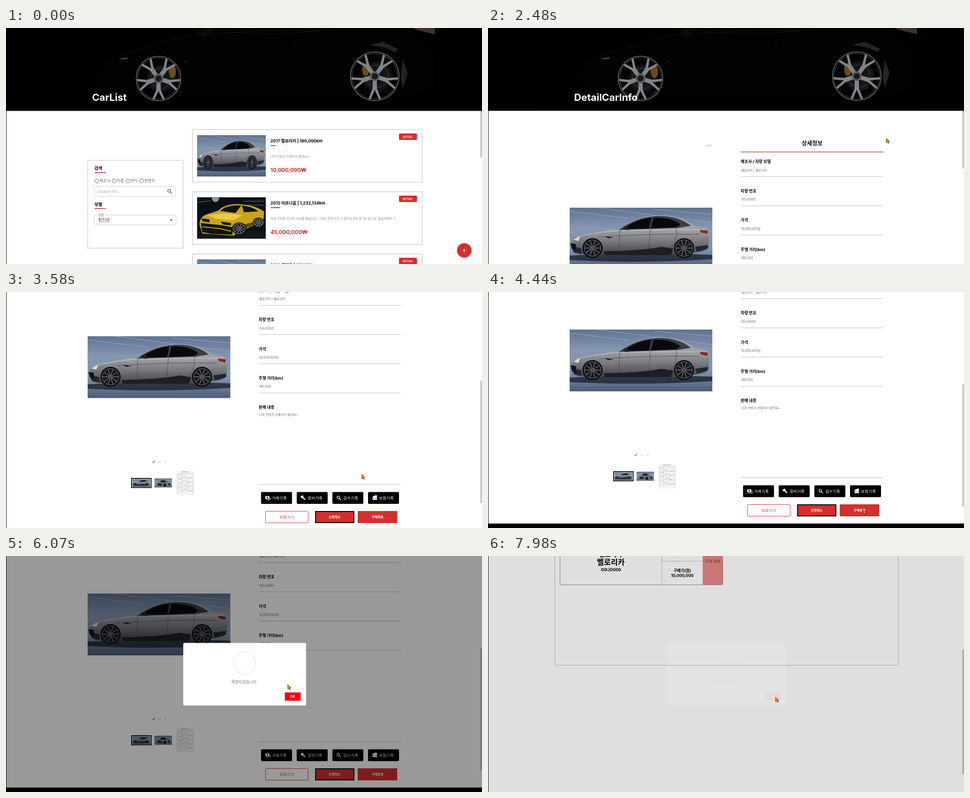
Write an HTML page that moves like this. It is 1061 by 528 pixels and loops after 8 s.

```html
<!DOCTYPE html>
<html lang="ko">
<head>
<meta charset="utf-8">
<style>
html, body { margin: 0; width: 100%; height: 100%; overflow: hidden; background: #fff; }
svg { display: block; width: 1061px; height: 528px; font-family: Inter, 'Noto Sans CJK KR', 'Noto Sans CJK JP', sans-serif; }
#thumb { mix-blend-mode: multiply; }
</style>
</head>
<body>
<svg id="stage" viewBox="0 0 1061 528"></svg>
<script>
const RED = '#d32f2f', BOLD = 'font-weight="700"', MID = 'text-anchor="middle"';
const MAKER = '벨로리카', PLATE = '00나0000', NOTE = '너무 연비가 안좋아서 팔아요~';

const text = (x, y, size, str, fill = '#000', extra = '') =>
  `<text x="${x}" y="${y}" font-size="${size}" fill="${fill}" ${extra}>${str}</text>`;
const rect = (x, y, w, h, fill, extra = '') =>
  `<rect x="${x}" y="${y}" width="${w}" height="${h}" fill="${fill}" ${extra}/>`;
const circle = (x, y, r, fill, extra = '') => `<circle cx="${x}" cy="${y}" r="${r}" fill="${fill}" ${extra}/>`;
const path = (d, fill, extra = '') => `<path d="${d}" fill="${fill}" ${extra}/>`;
const line = (d, stroke, width = 1, extra = '') => path(d, 'none', `stroke="${stroke}" stroke-width="${width}" ${extra}`);
const box = (x, y, w, h, stroke = '#bbb', r = 0) => rect(x, y, w, h, 'none', `stroke="${stroke}" rx="${r}"`);
const group = (id, body, extra = '') => `<g id="${id}" ${extra}>${body}</g>`;
const use = (id, x, y, w, h) => `<use href="#${id}" x="${x}" y="${y}" width="${w}" height="${h}"/>`;
const repeat = (n, f) => Array.from({ length: n }, (_, i) => f(i)).join('');
const gradient = (id, ...colors) => `<linearGradient id="${id}" x2="0" y2="1">${
  colors.map((c, i) => `<stop offset="${i / (colors.length - 1)}" stop-color="${c}"/>`).join('')}</linearGradient>`;
const symbol = (id, w, h, body) => `<symbol id="${id}" viewBox="0 0 ${w} ${h}" preserveAspectRatio="none">${body}</symbol>`;

// Photos as flat shapes
const smallWheel = (x, y, r) => circle(x, y, r, '#0d0e12') +
  circle(x, y, r * .82, '#15171c', 'stroke="#85878d" stroke-width="1"') +
  repeat(10, i => line(`M${x},${y}V${y - r * .8}`, '#8c8e94', 1.2, `transform="rotate(${i * 36 + 18} ${x} ${y})"`)) +
  circle(x, y, 2.5, '#44464c');

const sedan = rect(0, 0, 318, 139, 'url(#studio)') +
  line('M0,8L130,24M60,0L318,34M190,4L318,15', '#a6b6cb', 1.5, 'opacity=".5"') +
  path('M0,108Q160,98 318,106V116Q160,126 0,118Z', '#161d2c', 'opacity=".75"') +
  path('M3,84Q3,74 14,66Q60,52 112,49Q150,20 195,18Q245,17 276,40L304,46Q312,52 311,70L309,92Q300,98 285,100L230,108L75,108L20,104Q4,100 3,84Z', 'url(#silver)') +
  path('M108,50Q148,21 195,19Q243,18 270,41L240,46L122,50Z', '#3a3d44') +
  path('M119,48Q150,25 182,23L177,47ZM187,23Q226,21 247,38L238,44L181,47Z', '#07090d') +
  line('M110,49Q150,20 195,18Q245,17 276,40', '#a5a8ae', 1.3) +
  line('M14,67Q60,55 112,51M116,52Q200,49 300,50', '#c6c7ca', 1.6, 'opacity=".7"') +
  line('M66,66Q180,58 288,60M180,48L176,98M238,46Q240,70 226,92M112,51Q108,80 114,98', '#3c3e45', .8) +
  path('M76,98Q160,97 205,88L231,92L226,107H78Z', '#1d1f25') +
  path('M3,86L26,92V103L10,101Z', '#24262d') + path('M280,88L309,84L307,92L284,99Z', '#24262d') +
  path('M78,64L98,67L86,69Z', '#16213a') + path('M8,72L24,64L19,75Z', '#d5dbe4') +
  path('M2,80L14,82L14,95L5,93Z', '#111318') + path('M290,50L308,52L307,59L293,56Z', '#8c2420') +
  path('M120,42l12,2v7l-11,-2z', '#202228') + smallWheel(51, 91, 22.5) + smallWheel(255, 91, 22.5);

const front = rect(0, 0, 100, 52, 'url(#studio)') +
  path('M12,27Q28,21 34,12Q55,7 72,14L88,25L92,39L60,45L14,42Q9,34 12,27Z', '#6d7077') +
  path('M33,20L39,12Q55,9 65,15L62,22Z', '#10131a') + path('M17,29L43,31L40,41L18,39Z', '#1a1c22') +
  circle(59, 38, 8, '#101217') + circle(85, 34, 6, '#101217');

const yellow = rect(0, 0, 153, 94, '#0b1016') + rect(0, 76, 153, 18, '#14171a') +
  line('M0,12L30,8M104,9H150M112,18H150', '#3b4a55', 2) + circle(41, 3, 8, '#87949b') +
  '<g transform="translate(153 0) scale(-1.16 1)">' +
  path('M3,33Q20,18 50,16Q78,14 91,30L116,40Q128,47 127,63L122,82L62,87L48,76L22,64L5,57Z', '#c9a51d') +
  path('M14,32Q28,20 46,19L42,34ZM47,19Q74,16 88,31L58,36Z', '#0f1316') +
  path('M45,41Q78,33 112,41L96,49L62,52Z', '#e6cb48') + path('M8,52L44,62V72L22,64Z', '#5f4f14') +
  path('M67,58L87,55L82,62L67,64ZM108,50L124,48L121,55L108,57Z', '#15170f') +
  path('M64,68L87,63L106,61L125,58L122,79L104,83L64,85Z', '#111310') +
  line('M67,77L88,71L106,69L122,67', '#c9a51d', 2) + smallWheel(14, 57, 11) + smallWheel(51, 71, 14) + '</g>';

const paper = rect(0, 0, 39, 54, '#fafafa', 'stroke="#ccc" stroke-width=".5"') +
  text(19.5, 4, 3, '차량 등록 원부', '#555', MID) +
  repeat(15, i => line(`M2,${6 + i * 3.2}H37`, i % 3 ? '#ccc' : '#888', .5)) +
  line('M2,6V51M12,6V51M25,19V42M37,6V51', '#aaa', .5) +
  repeat(12, i => line(`M${4 + i % 3 * 11},${9 + i * 3.2}h${5 + i % 4}`, '#8892a4', .8));

const bigWheel = (x, y, r, caliper) => circle(x, y, r, '#020202') +
  circle(x + 5, y, r * .6, '#131416') + circle(x + 5, y, r * .45, 'none', 'stroke="#25262a" stroke-width="3"') +
  `<ellipse cx="${x + caliper}" cy="${y - 15}" rx="8" ry="14" fill="#6d4d12"/>` +
  circle(x, y, r - 1.5, 'none', 'stroke="#5f6063" stroke-width="2"') +
  circle(x, y, r - 5, 'none', 'stroke="#333437" stroke-width="1.5"') +
  repeat(5, i => path(`M-4.5,-8L-5,${-r * .5}L-14,${5 - r}L-9,${4 - r}L0,${-r * .55}L9,${4 - r}L14,${5 - r}L5,${-r * .5}L4.5,-8Z`,
    '#838487', `transform="translate(${x} ${y}) rotate(${i * 72 + 36})"`)) +
  circle(x, y, 11, '#5d5e62') + circle(x, y, 7, '#1a1b1d');

const banner = title => rect(0, 0, 1061, 185.5, '#000') + rect(107, 0, 849, 180, '#010102') +
  path('M200,100Q212,72 262,56Q340,28 412,0H905L956,60V130L890,155H290L205,135Z', '#020203') +
  path('M470,0L440,22L425,10L445,0Z', '#0a0a0c') +
  line('M248,64Q330,40 400,17Q580,2 700,9M480,8Q640,20 730,0', '#141518') +
  path('M252,69L270,65L271,69L258,71Z', '#57361a') +
  path('M905,0H956V14L926,7Z', '#3d332c') +
  path('M812,38L840,31L874,47L868,54L846,44ZM884,70L895,100L885,135L880,110Z', '#242427') +
  circle(400, 75, 1, '#777') + circle(642, 38, 1, '#555') +
  bigWheel(340, 113, 51, 31) + bigWheel(822, 108, 55.5, -20) +
  text(192, 163, 22, title, '#fff', BOLD);

// List page
const card = (i, title, bar, note, price, photo) => `<g transform="translate(0 ${i * 139})">` +
  box(415.5, 227.5, 512, 117.5) + use(photo, 426, 239.5, 153, 93) +
  text(589.5, 255.5, 9.2, title, '#000', BOLD) + rect(590, 262, bar, 2, RED) +
  text(589.5, 290, 6.9, note, '#888') + text(589.5, 322.3, 11.9, price, RED, BOLD) +
  rect(876, 236, 40, 14.5, RED, `rx="2" id="detail${i}"`) +
  text(896, 245.6, 6.3, 'DETAIL', '#fff', `font-weight="600" letter-spacing=".2" ${MID}`) + '</g>';

const radio = (x, label) => circle(x, 342, 4.4, 'none', 'stroke="#555"') + text(x + 6, 345.3, 8.8, label, '#666');

const listPage = banner('CarList') +
  box(182, 296, 212.5, 196.5) +
  text(197, 317, 9.6, '검색', '#000', BOLD) + rect(197.5, 322.5, 24.5, 2, RED) +
  radio(202.5, '제조사') + radio(241, '차종') + radio(271.5, '연식') + radio(302, '컨텐츠') +
  box(197.5, 354.5, 180, 22, '#ccc', 2) + text(204.5, 368.7, 9, 'Search for...', '#aaa') +
  circle(363.8, 364, 3.2, 'none', 'stroke="#555" stroke-width="1.3"') + line('M366,366.3l4,4', '#555', 1.5) +
  text(197, 397.5, 9.6, '정렬', '#000', BOLD) + rect(197.5, 403, 24.5, 1.7, RED) +
  box(197.5, 418.5, 181.5, 22, '#ccc', 2) + rect(202, 417, 19, 3, '#fff') +
  text(205, 420.5, 7, '정렬', '#777') + text(205, 432.8, 9.8, '최신순', '#333') + path('M365,428h7l-3.5,3.7z', '#666') +
  card(0, `2017 ${MAKER} | 190,000km`, 10, NOTE, '10,000,000₩', 'sedan') +
  card(1, '2012 아르니움 | 1,232,134km', 21, '직장 가까운 곳으로 이사를 했습니다. 그래서 운전 빈도가 줄어서 5대 중 1대 팝니다. 껌값이에여 ㅋ', '45,000,000₩', 'yellow') +
  card(2, '2019 루민도 | 130,120km', 10, '', '', 'sedan') +
  circle(1021.5, 499.5, 16.5, '#000', 'opacity=".22" filter="url(#soft)"') + circle(1021.5, 497.5, 16, RED) +
  line('M1017.5,497.5h8M1021.5,493.5v8', '#fff', 1.2);

// Detail page
const rows = [['제조사 / 차량 모델', `${MAKER} / ${MAKER}`], ['차량 번호', PLATE], ['가격', '10,000,000원'], ['주행 거리(km)', '190,000'], ['판매 내용', NOTE]];
const icons = [
  rect(578, 759.5, 9, 6.5, '#fff', 'rx="1"') + circle(582.5, 762.7, 1.8, '#000') + line('M580,768h9v-6', '#fff'),
  line('M660,761l6.5,6.5', '#fff', 2.5) + circle(660, 761, 3, '#fff') + path('M656,757h3.5v3.5z', '#000'),
  circle(740.6, 762.5, 2.8, 'none', 'stroke="#fff" stroke-width="1.2"') + line('M742.6,764.7l3.4,3.6', '#fff', 1.4),
  path('M817,768v-5l2,-4h4v3h4v6z', '#fff') + circle(824.5, 760, 2.5, '#fff') + circle(819.5, 764.5, 1, '#000') + circle(824.5, 764.5, 1, '#000')];

const detailPage = banner('DetailCarInfo') +
  text(722.5, 262, 12.7, '상세정보', '#111', `font-weight="600" ${MID}`) + rect(563.5, 277, 318, 1.3, '#b3302f') +
  rows.map(([label], i) => text(563.3, 302.7 + i * 65.4, 8.9, label, '#000', BOLD) +
    rect(563.5, i < 4 ? 332.3 + i * 65.4 : 733, 316.5, 1, '#bbb')).join('') +
  group('late', rows.map(([, value], i) => text(564.5, (i < 4 ? 321.2 : 318) + i * 65.4, 6.9, value, '#666')).join('') +
    text(484, 265.5, 5.4, '1 of 3', '#777') + use('sedan', 182, 402, 318, 138.5) +
    repeat(3, i => line(`M${330 + i * 13.3},680a2.6,2.6 0 0 1 -4,3.4`, i ? '#ccc' : '#444', 1.1)) +
    rect(280, 720, 43.5, 20.5, '#fff', 'stroke="#111" stroke-width="2"') + use('sedan', 282, 721.5, 39.5, 17.5) +
    use('front', 331, 720, 39, 20.5) + use('paper', 380, 703.5, 38.5, 54)) +
  ['거래기록', '정비기록', '검수기록', '보험기록'].map((label, i) => rect(568.5 + i * 79.5, 750.5, 69, 26.5, '#000', 'rx="2.5"') +
    text(593 + i * 79.5, 766.8, 8.5, label, '#fff', 'font-weight="500" letter-spacing=".4"') + icons[i]).join('') +
  box(578.5, 793.5, 95, 26, RED, 2) + text(626, 809.5, 8.5, '뒤로가기', RED, `font-weight="500" letter-spacing=".3" ${MID}`) +
  rect(690, 794, 85.5, 25, RED, 'stroke="#000" stroke-width="2"') + rect(784, 793, 88, 27, RED, 'rx="1"') +
  text(732.5, 809, 7.2, '신청취소', '#fff', `${BOLD} ${MID}`) + text(828, 809, 7.2, '구매확정', '#fff', `${BOLD} ${MID}`) +
  rect(0, 836, 1061, 60, '#000');

// Purchase page
const myPage = box(149, -20, 765.5, 264.5, '#bbb', 3) + box(160.5, -20, 363, 84.5, '#888', 3) +
  text(273.5, 1, 14, MAKER, '#000', `${BOLD} ${MID}`) + text(273.7, 20, 16.8, MAKER, '#000', `${BOLD} ${MID}`) +
  text(274, 33.5, 9, PLATE, '#000', `${BOLD} ${MID}`) +
  path('M478.5,-5H523.5V61.5Q523.5,64 521,64H478.5Z', '#e68787') +
  line('M387.5,0V64M387.5,11.5H524', '#888', 1, 'stroke-dasharray="2 1.5"') +
  text(501, 14.7, 8.8, '구매 완료', '#823c25', MID) +
  text(433, 36, 8.8, '구매가(원)', '#000', `${BOLD} ${MID}`) + text(433, 46.6, 8.8, '10,000,000', '#000', `${BOLD} ${MID}`);

// Dialogs
const confirmBox = rect(399.2, 223.5, 265.5, 82, '#fff', 'rx="3"') +
  text(531.5, 257, 8.5, '구매 확정을 원하시면 구매확정을 눌러주세요.', '#5c5c5c', MID) +
  rect(547.5, 276.8, 51, 18.5, '#efefef', 'rx="2"') + text(573, 288.8, 7.4, '나가기', '#555', `font-weight="600" ${MID}`) +
  rect(602.3, 276.8, 50.7, 18.5, '#f00', 'rx="1"') + text(627.6, 288.8, 7.4, '구매확정', '#fff', `font-weight="600" ${MID}`);
const doneBox = rect(399.2, 196.5, 265.5, 136, '#fff', 'rx="3"') +
  circle(531.5, 239.5, 24, 'none', 'stroke="#a5dc86" stroke-opacity=".25" stroke-width="2.2"') +
  line('M518.5,239.5L527,248L546.5,230.5', '#a5dc86', 3, 'id="check" pathLength="1" stroke-dasharray="1 2"') +
  text(531.7, 284.4, 8.5, '확정되었습니다.', '#777', MID) +
  rect(618, 303, 36, 20, '#c5d5e2', 'rx="2"') + rect(619.2, 304.2, 33.6, 17.6, '#f00') +
  text(635.8, 315.7, 7.4, 'OK', '#fff', `${BOLD} ${MID}`);

document.getElementById('stage').innerHTML = `<defs>${
  gradient('studio', '#5f7290', '#8597b1', '#8193ad', '#4d5c78')}${
  gradient('silver', '#8f9095', '#a3a4a8', '#75767b', '#3b3d43')}${
  symbol('sedan', 318, 139, sedan)}${symbol('front', 100, 52, front)}${symbol('yellow', 153, 94, yellow)}${symbol('paper', 39, 54, paper)}
  <filter id="soft"><feGaussianBlur stdDeviation="2"/></filter></defs>` +
  rect(0, 0, 1061, 528, '#fff') + group('list', listPage) + group('info', detailPage) + group('mine', myPage) +
  rect(1057.5, 38, 3, 252, '#bbb', 'id="thumb" rx="1"') +
  group('overlay', rect(0, 0, 1061, 528, '#000', 'opacity=".4"') + group('confirm', confirmBox) + group('done', doneBox)) +
  group('status', rect(1, 517, 353, 11, '#b39f6b') + text(4, 525, 7, 'carbom.site의 응답을 기다리는 중...', '#8b7947')) +
  rect(0, 0, 1, 528, '#000') +
  group('cursor', path('M0,0V10L2.4,7.9L4.1,11.3L5.8,10.5L4.2,7.2L7.2,7Z', '#e8922e', 'stroke="#3a2417" stroke-width=".9"'));

const el = Object.fromEntries([...document.querySelectorAll('#stage [id]')].map(e => [e.id, e]));
const set = (name, attrs) => { for (const k in attrs) el[name].setAttribute(k, attrs[k]); };
const show = (name, on) => set(name, { visibility: on ? 'visible' : 'hidden' });
const clamp = x => Math.min(1, Math.max(0, x));

// CSS "ease": cubic-bezier(.25, .1, .25, 1)
function ease(x) {
  x = clamp(x);
  const curve = (u, a, b) => 3 * u * (1 - u) ** 2 * a + 3 * u * u * (1 - u) * b + u ** 3;
  let lo = 0, hi = 1;
  for (let i = 0; i < 20; i++) {
    const mid = (lo + hi) / 2;
    if (curve(mid, .25, .25) < x) lo = mid; else hi = mid;
  }
  return curve(lo, .1, 1);
}

function track(keys, t) {
  const i = keys.findIndex(k => k[0] > t);
  if (i < 0) return keys[keys.length - 1].slice(1);
  if (i === 0) return keys[0].slice(1);
  const a = keys[i - 1], b = keys[i], p = (t - a[0]) / (b[0] - a[0]);
  return a.slice(1).map((v, j) => v + (b[j + 1] - v) * p);
}

// Dialog pop: .5 -> 1.05 -> .95 -> 1 within 300 ms
function pop(ms) {
  const p = clamp(ms / 300);
  if (p < .45) return .5 + .55 * ease((p - .01) / .44);
  return p < .8 ? 1.05 - .1 * ease((p - .45) / .35) : .95 + .05 * ease((p - .8) / .2);
}
const scaled = s => `translate(532 264.5) scale(${s}) translate(-532 -264.5)`;

const pointer = [[250, 1000, 486], [450, 870, 415], [650, 757, 318], [830, 820, 268], [1010, 888, 247], [3250, 888, 247],
  [3400, 835, 335], [3580, 793, 408], [3950, 818, 424], [4180, 840, 448], [4400, 836, 487], [4850, 836, 487], [5120, 715, 370],
  [5400, 624, 289], [5460, 623, 288], [5800, 623, 288], [6070, 628, 288], [6550, 633, 294], [6750, 636, 301], [7220, 641, 316]];
const scrolling = [[2480, 0], [2750, 65], [3000, 165], [3250, 265], [3400, 303], [3650, 303], [3850, 318]];
const OPEN = 4708, ACCEPT = 5790, DONE = 5920, MINE = 6480, CLOSE = 7860;

function render(t) {
  const [scroll] = track(scrolling, t), onList = t < 2000, onMine = t >= MINE;
  show('list', onList);
  show('info', !onList && !onMine);
  show('mine', onMine);
  show('late', !onList && !onMine && t >= 2150);
  set('info', { transform: `translate(0 ${-scroll})` });
  set('thumb', onList ? { y: 38, height: 252 } : onMine ? { y: 210, height: 278 } : { y: 40 + scroll * .522, height: 274 });
  set('detail0', { fill: t < 1010 ? RED : t >= 1080 && t < 1150 ? '#d95050' : '#c62828' });

  const first = ease((t - OPEN) / 300) * (1 - ease((t - ACCEPT) / 300));
  const second = ease((t - DONE) / 150) * (1 - ease((t - CLOSE) / 300));
  set('overlay', { opacity: Math.max(first, second) });
  set('confirm', { opacity: ease((t - OPEN) / 200) * (1 - ease((t - ACCEPT) / 130)), transform: scaled(pop(t - OPEN)) });
  set('done', { opacity: ease((t - DONE) / 150) * (1 - ease((t - CLOSE) / 200)), transform: scaled(pop(t - DONE)) });
  show('check', t > 6330);
  set('check', { 'stroke-dashoffset': 1 - ease((t - 6330) / 260) });
  set('status', { opacity: onMine ? 1 - clamp((t - 6820) / 300) : 0 });

  const [x, y] = track(pointer, t);
  show('cursor', t >= 250);
  set('cursor', { transform: `translate(${x} ${y})` });
}

const start = performance.now();
(function loop() {
  render((performance.now() - start) % 8000);
  requestAnimationFrame(loop);
})();
</script>
</body>
</html>
```
